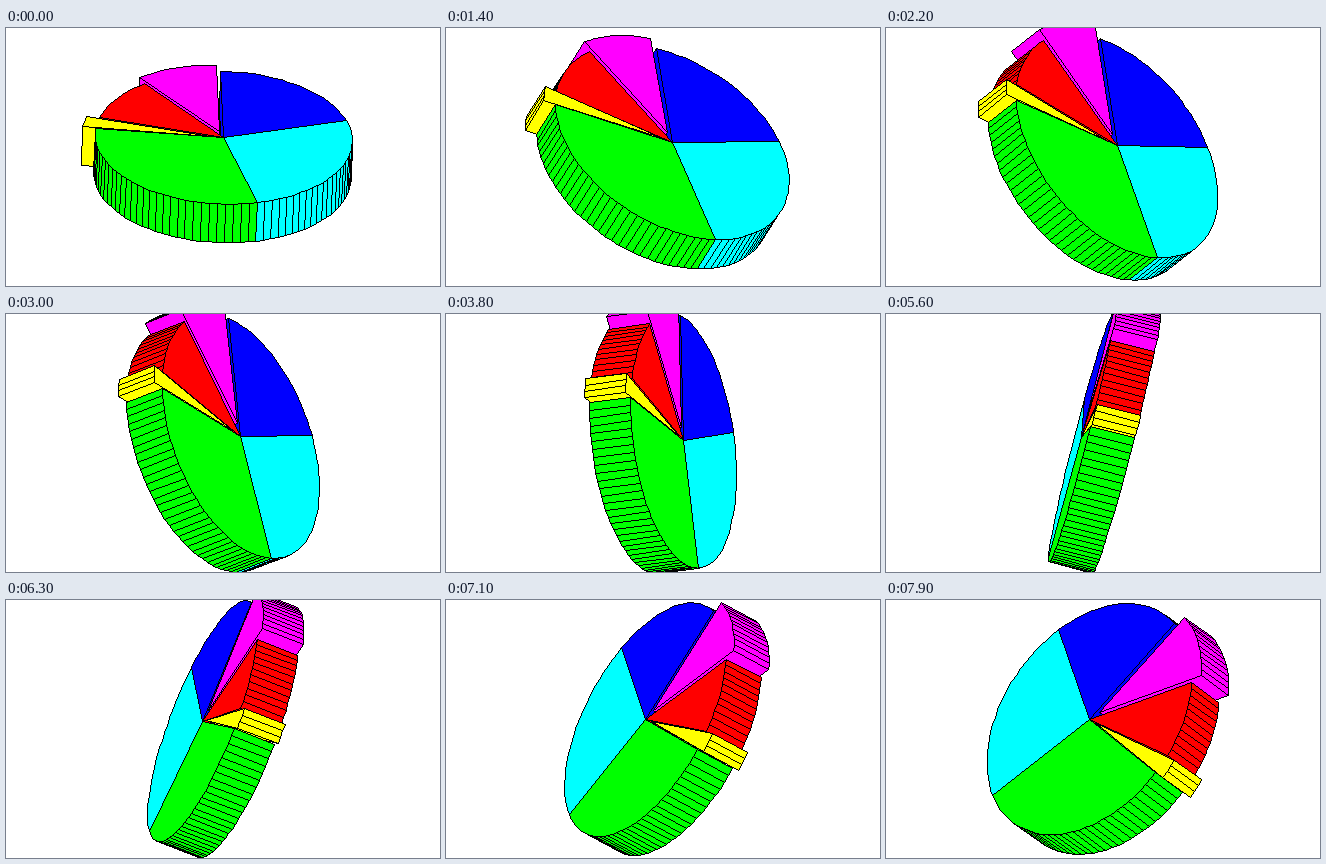
A matplotlib script for the animation above (8000 ms loop, 434 px wide and 258 px high).

```python
import numpy as np
import matplotlib.pyplot as plt
from matplotlib.animation import FuncAnimation
from matplotlib.colors import to_rgb
from matplotlib.path import Path

W, H, DPI = 434, 258, 64
CENTER = np.array([W / 2, H / 2])
RADIUS = 128.7        # pixels
HEIGHT = 0.35         # in radii
PULL = 0.1            # offset of the pulled-out slices
FRAMES, INTERVAL = 80, 100
STEP = np.radians(2)

SHARES = np.array([1, 0.25, 3, 2.5, 2, 1])
COLORS = ["#ff0000", "#ffff00", "#00ff00", "#00ffff", "#0000ff", "#ff00ff"]
PULLED = [False, True, False, False, False, True]


def view_matrix(az, el):
    """Rows are the screen's right, up and towards-the-viewer directions."""
    ca, sa, ce, se = np.cos(az), np.sin(az), np.cos(el), np.sin(el)
    return np.array([[ca, sa, 0],
                     [-sa * se, ca * se, ce],
                     [sa * ce, -ca * ce, se]])


def rotation(axis, angle):
    x, y, z = axis
    k = np.array([[0, -z, y], [z, 0, -x], [-y, x, 0]])
    return np.eye(3) + np.sin(angle) * k + (1 - np.cos(angle)) * k @ k


VIEW = view_matrix(np.radians(-37.5), np.radians(30))
TILT = np.radians(20)
AXIS = np.array([np.cos(TILT) ** 2, np.cos(TILT) * np.sin(TILT), np.sin(TILT)])


def make_slice(start, span, color, pulled):
    """Return middle angle, half span, colour and (points, normal) faces."""
    n = max(1, int(np.ceil(100 * span / (2 * np.pi) - 1e-9)))
    t = start + span * np.arange(n + 1) / n
    mid = start + span / 2
    shift = PULL * pulled * np.array([np.cos(mid), np.sin(mid)])
    rim = np.column_stack([np.cos(t), np.sin(t)])
    ring = np.vstack([[0, 0], rim, [0, 0]]) + shift

    def level(points, z):
        return np.column_stack([points, np.full(len(points), z)])

    low, high = -HEIGHT / 2, HEIGHT / 2
    faces = [(level(ring[:-1], low), np.array([0, 0, -1])),
             (level(ring[:-1], high), np.array([0, 0, 1]))]
    for p, q in zip(ring[:-1], ring[1:]):
        quad = np.vstack([level(np.array([p, q]), low),
                          level(np.array([q, p]), high)])
        d = q - p
        faces.append((quad, np.array([d[1], -d[0], 0])))
    rgb = np.multiply(to_rgb(color), 255).astype(np.uint8)
    return mid, span / 2, rgb, faces


def plot(canvas, x, y, color):
    ok = (x >= 0) & (x < W) & (y >= 0) & (y < H)
    canvas[y[ok], x[ok]] = color


def draw_line(canvas, p, q):
    """One-pixel black line without antialiasing."""
    p, q = sorted([tuple(p), tuple(q)])
    n = max(abs(q[0] - p[0]), abs(q[1] - p[1])) + 1
    x, y = np.floor(np.linspace(p, q, n) + 0.5).astype(int).T
    plot(canvas, x, y, 0)


def draw_face(canvas, points, color):
    corners = np.floor(points).astype(int)
    (x0, y0), (x1, y1) = corners.min(axis=0), corners.max(axis=0)
    x, y = np.meshgrid(np.arange(x0, x1 + 1), np.arange(y0, y1 + 1))
    x, y = x.ravel(), y.ravel()
    outline = Path(np.vstack([corners, corners[:1]]), closed=True)
    inside = outline.contains_points(np.column_stack([x, y]))
    plot(canvas, x[inside], y[inside], color)
    for p, q in zip(corners, np.roll(corners, -1, axis=0)):
        draw_line(canvas, p, q)


spans = 2 * np.pi * SHARES / SHARES.sum()
starts = np.pi / 2 + np.concatenate([[0], np.cumsum(spans)[:-1]])
slices = [make_slice(*s) for s in zip(starts, spans, COLORS, PULLED)]

fig = plt.figure(figsize=(W / DPI, H / DPI), dpi=DPI, facecolor="white")
ax = fig.add_axes([0, 0, 1, 1])
ax.axis("off")
picture = ax.imshow(np.full((H, W, 3), 255, np.uint8),
                    interpolation="nearest", aspect="auto")


def update(i):
    m = VIEW @ rotation(AXIS, STEP * (i + 1))
    front = np.arctan2(m[2, 1], m[2, 0])

    def distance(piece):
        mid, half = piece[:2]
        d = abs((mid - front + np.pi) % (2 * np.pi) - np.pi)
        if d < half:
            return 0
        return np.pi if np.pi - d < half else d

    canvas = np.full((H, W, 3), 255, np.uint8)
    for _, _, color, faces in sorted(slices, key=distance, reverse=True):
        for points, normal in faces:
            if m[2] @ normal > 0:
                xy = points @ m[:2].T
                draw_face(canvas, CENTER + RADIUS * xy * [1, -1], color)
    picture.set_data(canvas)
    return [picture]


anim = FuncAnimation(fig, update, frames=FRAMES, interval=INTERVAL,
                     init_func=lambda: update(0), repeat=True, blit=False)
plt.show()
```
